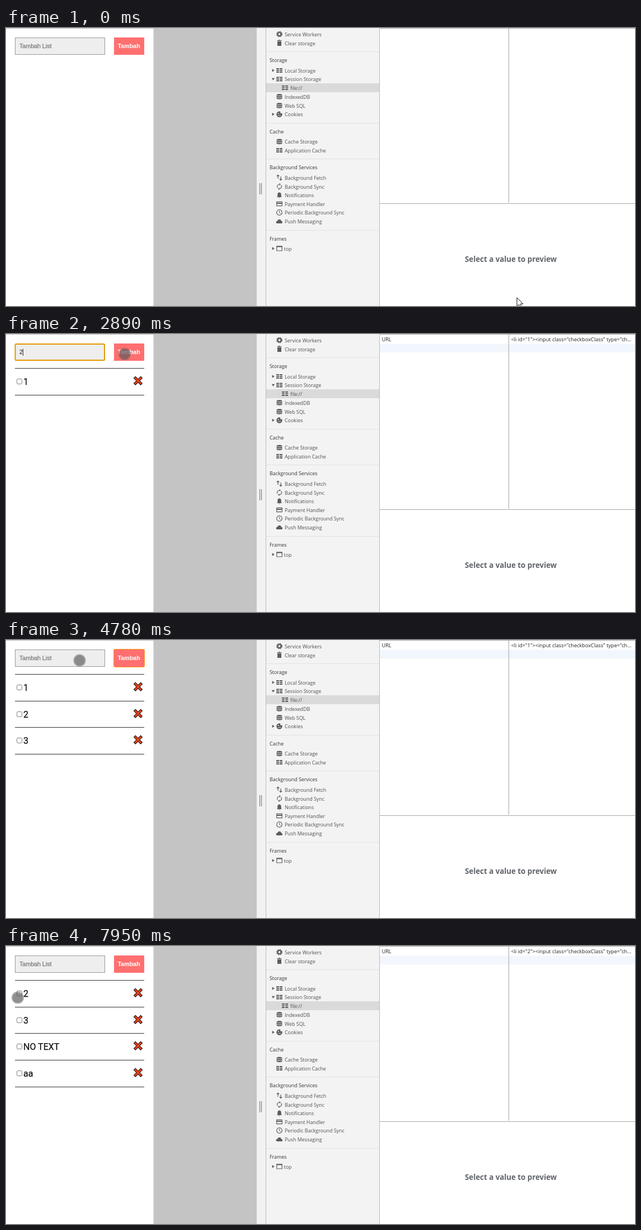
Write an HTML page that moves like this. It is 1124 px wide and 498 px high and loops after 8000 ms.

```html
<!DOCTYPE html>
<html lang="id">
<head>
<meta charset="utf-8">
<title>Tambah List</title>
<style>
html, body { margin: 0; width: 100%; height: 100%; overflow: hidden; background: #fff; }
svg { display: block; width: 1124px; height: 498px; }
.ui { font: 8.9px "Open Sans", "Noto Sans", sans-serif; fill: #505050; }
.head { fill: #333; }
.cell { font-size: 9.2px; fill: #222; }
.hint { font: 700 13.3px "Open Sans", "Noto Sans", sans-serif; fill: #5f6368; }
.field { font: 10.67px "Liberation Sans", Arial, sans-serif; }
.label { font-weight: 700; fill: #fff; text-anchor: middle; }
.item { font: 400 16px Roboto, sans-serif; fill: #111; stroke: #111; stroke-width: .25; }
.line { stroke: #bbb; fill: none; }
.ico { fill: #5c5c5c; }
.o { fill: none; stroke: #5c5c5c; stroke-width: 1.2; }
.w { fill: none; stroke: #f3f3f3; stroke-width: 1; }
</style>
</head>
<body>
<svg viewBox="0 0 1124 498" xmlns="http://www.w3.org/2000/svg">
  <defs>
    <g id="gear"><circle r="3" class="o" style="stroke-width:2.2"/><circle r="4.600" class="o" style="stroke-width:1.6" stroke-dasharray="2.4 1.213"/></g>
    <g id="trash"><path d="M-4-5H-1.500L-1-6H1L1.500-5H4V-3.800H-4ZM-3.500-3H3.500V5H-3.500Z"/></g>
    <g id="table"><path d="M-5.500-4H5.500V4H-5.500Z"/><path class="w" d="M-5.500-1.400H5.500M-5.500 1.400H5.500M0-4V4"/></g>
    <g id="db"><path d="M-5-3C-5-5.300 5-5.300 5-3V3C5 5.300-5 5.300-5 3Z"/><path class="w" d="M-5-2.500C-4-.8 4-.8 5-2.500M-5 .8C-4 2.500 4 2.500 5 .8"/></g>
    <g id="cookie"><circle r="5.200"/><circle cx="-1.800" cy="-1.500" r="1" fill="#f3f3f3"/><circle cx="1" cy="2" r="1" fill="#f3f3f3"/><circle cx="-2" cy="2" r=".7" fill="#f3f3f3"/><circle cx="3.500" cy="-3.500" r="2" fill="#f3f3f3"/></g>
    <g id="fetch"><path class="o" d="M-2.500 2V-4.500M-4.700-2.500L-2.500-4.700L-.3-2.500M2.500-2V4.500M.3 2.500L2.500 4.700L4.700 2.500"/></g>
    <g id="sync"><path class="o" d="M-3.200 2.400A4 4 0 0 1 0-4M3.200-2.400A4 4 0 0 1 0 4"/><path d="M0-6.200V-1.800L2.500-4ZM0 6.200V1.800L-2.500 4Z"/></g>
    <g id="bell"><path d="M-4.500 3.500L-3.300 2V-1C-3.300-6.300 3.300-6.300 3.300-1V2L4.500 3.500ZM-1.200 4.300H1.200L0 5.500Z"/></g>
    <g id="card"><path class="o" d="M-4.800-3.600H4.800V3.600H-4.800Z"/><path d="M-5-2H5V0H-5Z"/></g>
    <g id="clock"><circle class="o" r="4.800"/><path class="o" d="M0-3V.3L2.300 1.700" style="stroke-width:1"/></g>
    <g id="cloud"><path d="M-3.500 3.500C-7 3.500-6.500-1-3.300-1C-2.500-4.700 3-4.500 3.400-.8C6.500-.5 6.200 3.500 3.500 3.500Z"/></g>
    <g id="frame"><path class="o" d="M-4.700-4H4.700V4H-4.700Z"/><path d="M-5-4.500H5V-2.500H-5Z"/></g>
    <path id="shut" d="M-1.800-2.800L2.300 0L-1.800 2.800Z"/>
    <path id="open" d="M-2.800-1.800L0 2.300L2.800-1.800Z"/>
    <path id="cross" d="M-4.700-4.700L4.700 4.700M4.700-4.700L-4.700 4.700" fill="none" stroke-linecap="square"/>
  </defs>

  <rect width="1124" height="498" fill="#fff"/>
  <rect x="263.500" width="185" height="498" fill="#c4c4c4"/>
  <path class="line" d="M0 .5H264"/>
  <rect x="448" width="16" height="498" fill="#f2f2f2"/>
  <rect x="464" width="203" height="498" fill="#f3f3f3"/>
  <rect x="464" y="99" width="203" height="16" fill="#dadada"/>
  <path d="M453.500 278V298M456.500 278V298" stroke="#888" stroke-width="1.300"/>
  <path d="M464 42.500H667M464 170.500H667M464 234.500H667M464 362.500H667" stroke="#e2e2e2"/>
  <path class="line" d="M464.500 0V498M667.500 0V498"/>
  <path d="M667 .5H1124M898.500 1V313M667 314.500H1124" stroke="#a6a6a6"/>
  <g id="side"></g>
  <text class="hint" x="820" y="418.500">Select a value to preview</text>

  <g id="row">
    <rect x="668" y="17.500" width="230" height="15.500" fill="#f2f6fd"/>
    <rect x="899" y="17.500" width="225" height="15.500" fill="#f2f6fd"/>
    <text class="ui cell" x="671.500" y="13">URL</text>
    <text class="ui cell" x="902.500" y="13" id="value"></text>
  </g>

  <rect id="input" fill="#eee"/>
  <text class="field" id="typed" x="24" y="36.300"></text>
  <path id="caret" d="M0 26.500V39" stroke="#333"/>
  <rect x="193" y="17" width="54" height="31" fill="#ff6f6f"/>
  <rect id="ring" x="192.500" y="16.500" width="55" height="32" rx="2" fill="none" stroke="#f5a020"/>
  <text class="field label" x="219.700" y="36.300">Tambah</text>
  <g id="list"></g>

  <g id="touch">
    <circle r="9.500" fill="rgba(90,90,90,.68)"/>
    <circle r="10.300" fill="none" stroke="rgba(100,100,100,.5)" stroke-width="1.600"/>
  </g>
  <path id="arrow" d="M0 0V15.500L3.600 12.200L6.200 18L8.600 17L6.100 11.200H11Z" fill="#fff" stroke="#111"/>
</svg>
<script>
const LOOP = 8000, PITCH = 47.7, DELETED = 7400;
const $ = id => document.getElementById(id);
const set = (el, attrs) => { for (const k in attrs) el.setAttribute(k, attrs[k]); };
const show = (el, on) => { el.style.display = on ? '' : 'none'; };
const within = (t, spans) => spans.some(([a, b]) => t >= a && t < b);
const slotTop = i => Math.round(61 + i * PITCH);

// y, icon, label, optional tree arrow
const entries = [
  [11, 'gear', 'Service Workers'], [27, 'trash', 'Clear storage'],
  [57.5, '', 'Storage'],
  [76, 'table', 'Local Storage', 'shut'], [91.5, 'table', 'Session Storage', 'open'],
  [107, 'table', 'file://'], [123, 'db', 'IndexedDB'], [139, 'db', 'Web SQL'],
  [154.5, 'cookie', 'Cookies', 'shut'],
  [185, '', 'Cache'], [203.5, 'db', 'Cache Storage'], [219, 'table', 'Application Cache'],
  [249.5, '', 'Background Services'],
  [268, 'fetch', 'Background Fetch'], [284, 'sync', 'Background Sync'],
  [299.5, 'bell', 'Notifications'], [315, 'card', 'Payment Handler'],
  [330.5, 'clock', 'Periodic Background Sync'], [346.5, 'cloud', 'Push Messaging'],
  [377, '', 'Frames'], [395, 'frame', 'top', 'shut']
];
$('side').innerHTML = entries.map(([y, icon, label, tree]) => {
  const indent = label === 'file://' ? 10 : 0;
  const x = !icon ? 471 : label === 'top' ? 496.5 : 498 + indent;
  const use = (id, ux) => id ? `<use href="#${id}" x="${ux}" y="${y}"/>` : '';
  return `<g class="ico">${use(icon, 488.5 + indent)}${use(tree, 477.5)}</g>` +
    `<text class="ui${icon ? '' : ' head'}" x="${x}" y="${y + 3.5}">${label}</text>`;
}).join('');

// label and the time it is added
const items = [['1', 1625], ['2', 2895], ['3', 4415], ['NO TEXT', 5280], ['aa', 6665]];
$('list').innerHTML = items.map(([label]) => `<g>
  <path d="M16 .5H247" stroke="#333"/>
  <path class="foot" d="M16 48.500H247" stroke="#333"/>
  <rect x="19.500" y="19.500" width="9" height="9" rx="1.800" fill="#fff" stroke="#808080"/>
  <text class="item" x="31" y="29.500">${label}</text>
  <use href="#cross" x="236" y="22.800" stroke="#161010" stroke-width="5"/>
  <use href="#cross" x="236" y="22.800" stroke="#ee4218" stroke-width="3"/></g>`).join('');
const rows = [...$('list').children];

const inputFocus = [[760, 1625], [2200, 2895], [3400, 4415], [5750, 6665]];
const buttonFocus = [[1625, 2200], [2895, 3400], [4415, 5750], [6665, 7300]];
// text, from, until
const typing = [['1', 1000, 1625], ['2', 2450, 2895], ['3', 3860, 4415], ['a', 6030, 6160], ['aa', 6160, 6665]];
// time, x, y
const path = [
  [30, 913, 483], [620, 130, 40], [770, 110, 33], [1150, 110, 33], [1500, 214, 40],
  [1770, 214, 40], [2020, 116.5, 32], [2500, 116.5, 32], [2800, 212, 36], [3020, 212, 36],
  [3350, 99, 33.5], [3950, 99, 33.5], [4300, 214, 40], [4540, 214, 40], [4780, 131.5, 36.5],
  [4860, 124, 36], [5140, 214, 38], [5380, 214, 38], [5590, 116, 32.5], [6300, 116, 32.5],
  [6600, 214.5, 47], [6900, 214.5, 47], [7250, 236, 85], [7720, 236, 85], [7950, 21, 92.5]
];

function pointer(t) {
  const i = path.findIndex(p => p[0] > t);
  if (i === 0) return path[0].slice(1);
  if (i < 0) return path[path.length - 1].slice(1);
  const [t0, x0, y0] = path[i - 1], [t1, x1, y1] = path[i];
  const p = (t - t0) / (t1 - t0), e = p * p * (3 - 2 * p);
  return [x0 + (x1 - x0) * e, y0 + (y1 - y0) * e];
}

function draw(t) {
  const gone = t >= DELETED ? 1 : 0;
  const last = items.filter(([, born]) => t >= born).length - 1;
  items.forEach(([, born], i) => {
    const p = Math.min(1, Math.max(0, (t - born) / 300));
    const e = 1 - (1 - p) ** 2;
    const top = slotTop(i - gone), foot = rows[i].querySelector('.foot');
    show(rows[i], i <= last && i >= gone);
    set(rows[i], { opacity: e, transform: `translate(0 ${top + Math.round(20 * (1 - e))})` });
    show(foot, i === last);
    set(foot, { transform: `translate(0 ${slotTop(i - gone + 1) - top - 48})` });
  });

  show($('row'), t >= items[0][1]);
  $('value').textContent = `<li id="${gone + 1}"><input class="checkboxClass" type="ch...`;

  const focus = within(t, inputFocus);
  set($('input'), focus
    ? { x: 16.5, y: 18, width: 159.5, height: 29, rx: 1.5, stroke: '#e59700', 'stroke-width': 2 }
    : { x: 16.5, y: 17.5, width: 160, height: 30, rx: 0, stroke: '#999', 'stroke-width': 1 });
  const entry = typing.find(([, from, to]) => t >= from && t < to);
  const typed = $('typed');
  typed.textContent = entry ? entry[0] : 'Tambah List';
  set(typed, { fill: entry ? '#111' : '#777', stroke: entry ? 'none' : '#777', 'stroke-width': .25 });
  show($('caret'), focus);
  set($('caret'), { transform: `translate(${24.5 + (entry ? typed.getComputedTextLength() : 0)} 0)` });
  show($('ring'), within(t, buttonFocus));

  const [x, y] = pointer(t);
  for (const id of ['touch', 'arrow']) {
    show($(id), (id === 'touch') === (x < 264));
    set($(id), { transform: `translate(${x} ${y})` });
  }
}

function tick() {
  draw(performance.now() % LOOP);
  requestAnimationFrame(tick);
}
tick();
</script>
</body>
</html>
```
